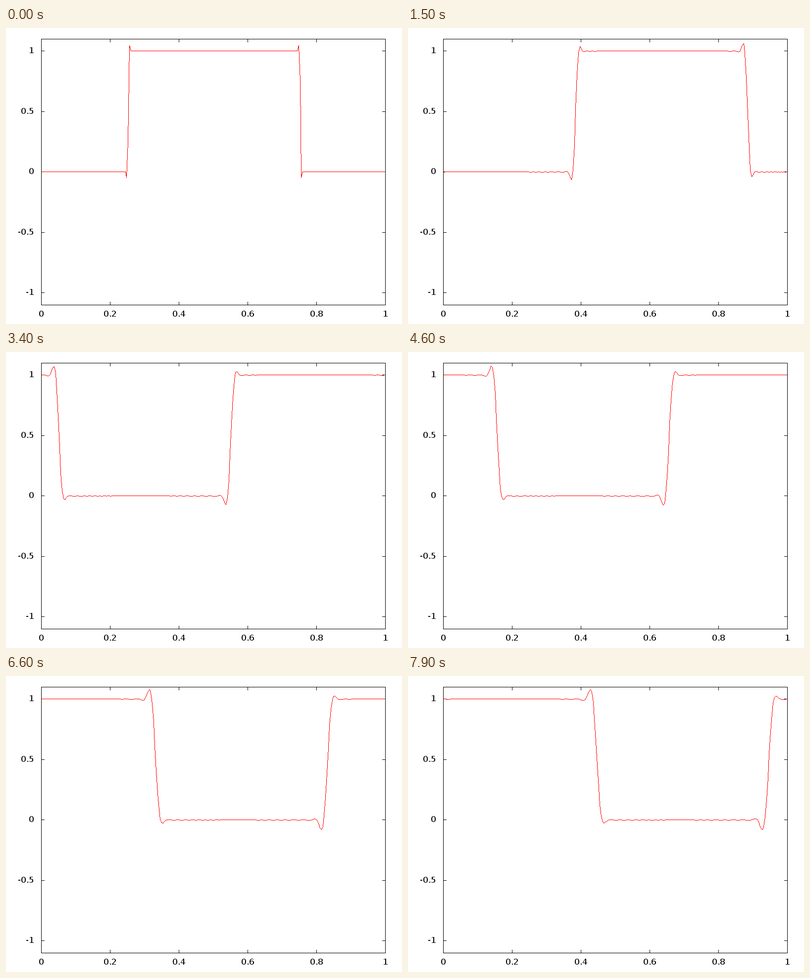
A matplotlib script that plays this animation: 800x600 px, repeating every 8000 ms.

```python
import numpy as np
import matplotlib.pyplot as plt
from matplotlib.animation import FuncAnimation

W, H, DPI = 800, 600, 100
LEFT, RIGHT, TOP, BOTTOM = 71, 766, 22, 561
FRAMES, STEPS = 80, 3
N, CFL = 256, 0.75
BLACK, RED = (0, 0, 0), (255, 0, 0)

# Full hinting gives thin stems and whole-pixel letter spacing
plt.rcParams.update({"font.family": "DejaVu Sans", "font.size": 12,
                     "text.hinting": "default", "text.hinting_factor": 1})


def col(x):
    return (LEFT + np.floor((RIGHT - LEFT) * x + 0.5)).astype(int)


def row(y):
    base = H - 1 - BOTTOM
    return (H - 1 - np.floor(base + (y + 1.1) * 245 + 0.5)).astype(int)


def line(canvas, x0, y0, x1, y1, color):
    """One-pixel line without antialiasing (Bresenham)."""
    dx, dy = x1 - x0, y1 - y0
    steep = abs(dy) > abs(dx)
    if (dy if steep else dx) < 0:
        x0, y0, dx, dy = x1, y1, -dx, -dy
    n = max(abs(dx), abs(dy), 1)
    k = np.arange(n + 1)
    xs = x0 + np.sign(dx) * ((2 * k * abs(dx) + n) // (2 * n))
    ys = y0 + np.sign(dy) * ((2 * k * abs(dy) + n) // (2 * n))
    canvas[ys, xs] = color


def advect(u):
    """One step of Fromm's scheme on a periodic grid."""
    slope = (np.roll(u, -1) - np.roll(u, 1)) / 2
    flux = u + (1 - CFL) / 2 * slope
    return u - CFL * (flux - np.roll(flux, 1))


def solve():
    u = advect(np.where(np.abs(x - 0.5) < 0.25, 1.0, 0.0))
    states = [u]
    for _ in range(FRAMES - 1):
        for _ in range(STEPS):
            u = advect(u)
        states.append(u)
    return states


def printed(u):
    """Values as written with six significant digits."""
    return np.where(np.abs(u) < 0.1, u, np.round(u, 6))


def label(x, y, value, ha):
    fig.text(x / W, 1 - y / H, f"{value:g}", ha=ha, va="baseline")


x = (np.arange(N) + 0.5) / N
states = solve()
fig = plt.figure(figsize=(W / DPI, H / DPI), dpi=DPI, facecolor="white")

# Border, ticks and labels
plot = np.full((H, W, 3), 255, np.uint8)
for r in (TOP, BOTTOM):
    line(plot, LEFT, r, RIGHT, r, BLACK)
for c in (LEFT, RIGHT):
    line(plot, c, TOP, c, BOTTOM, BLACK)
for v in np.arange(6) / 5:
    c = col(v)
    line(plot, c, TOP, c, TOP + 6, BLACK)
    line(plot, c, BOTTOM - 6, c, BOTTOM, BLACK)
    label(c + 0.5, 585, v, "center")
for v in np.arange(-2, 3) / 2:
    r = row(v)
    line(plot, LEFT, r, LEFT + 6, r, BLACK)
    line(plot, RIGHT - 6, r, RIGHT, r, BLACK)
    label(57, r + 5, v, "right")

image = fig.figimage(plot)


def draw(n):
    canvas = plot.copy()
    xs, ys = col(x), row(printed(states[n]))
    for x0, y0, x1, y1 in zip(xs, ys, xs[1:], ys[1:]):
        line(canvas, x0, y0, x1, y1, RED)
    image.set_data(canvas)
    return image,


anim = FuncAnimation(fig, draw, frames=FRAMES, interval=100, repeat=True,
                     repeat_delay=0)
plt.show()
```
